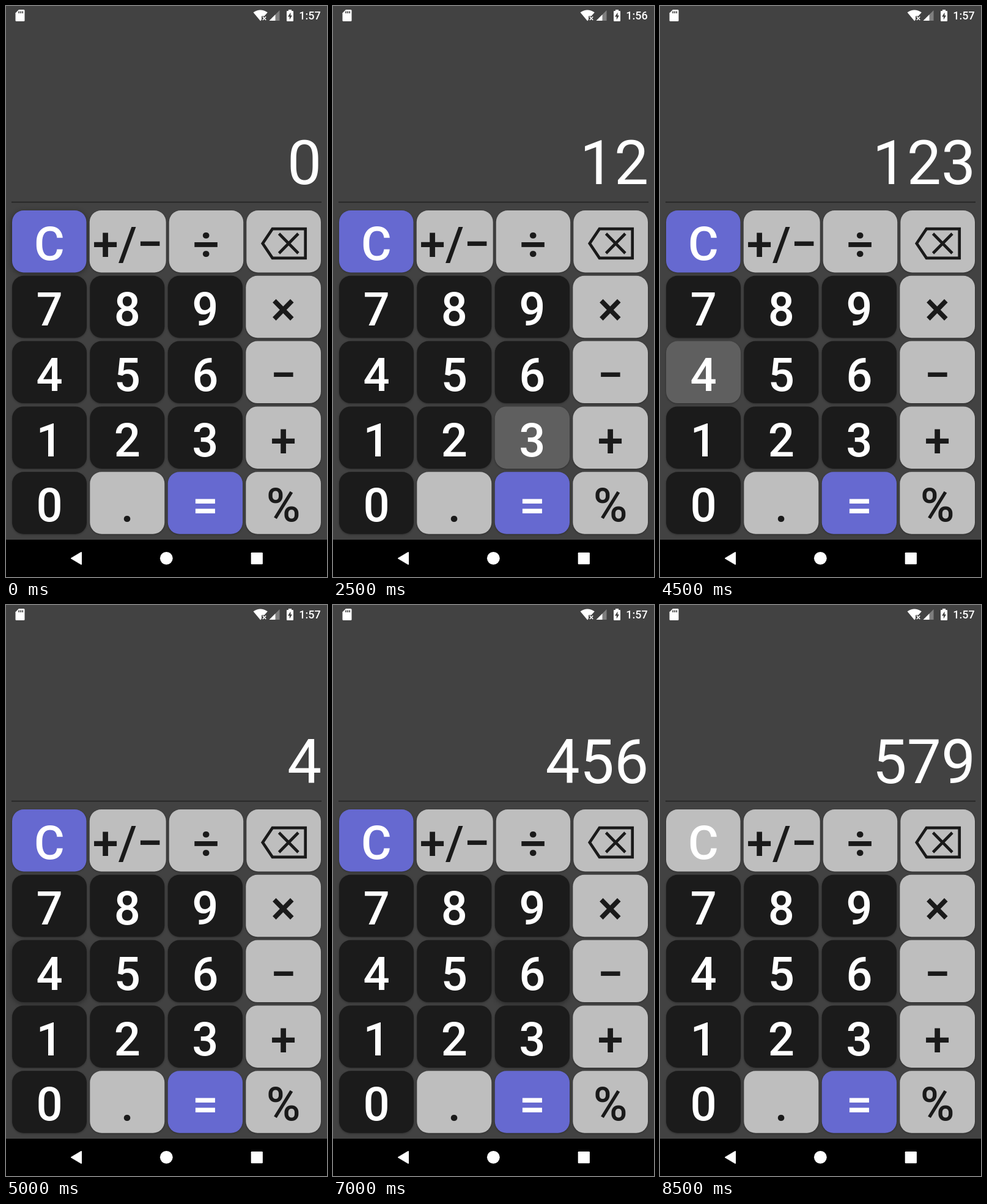
Animation of 525 by 933 pixels, one loop 9 s. Source, as an HTML page:

```html
<!DOCTYPE html>
<html lang="en">
<head>
<meta charset="utf-8">
<title>Calculator</title>
<style>
  html, body { margin: 0; width: 100%; height: 100%; overflow: hidden; background: #424242; }
  svg { display: block; width: 100%; height: 100%; font-family: Roboto, sans-serif; }
  .key text { font-size: 76px; font-weight: 500; text-anchor: middle; }
  .key rect { filter: drop-shadow(0 1.5px 1.5px rgba(0, 0, 0, .32)); }
  .key.raised rect { filter: drop-shadow(0 2.5px 4px rgba(0, 0, 0, .42)); }
</style>
</head>
<body>
<svg id="stage" viewBox="0 0 525 933">
  <rect width="525" height="933" fill="#424242"/>

  <g fill="#fff">
    <path d="M21 6H29Q30.5 6 30.5 7.5V23.5Q30.5 25 29 25H17Q15.5 25 15.5 23.5V11.5Z"/>
    <path d="M21.2 8.5V12M24.2 8.5V12M27.2 8.5V12" stroke="#424242" stroke-width="1.7"/>
    <path d="M404.5 10.5Q416 2.5 427.8 10.5L422.5 16.5H418V22.3L416.2 24.5Z"/>
    <path d="M419.8 17.5L425.2 23M425.2 17.5L419.8 23" stroke="#fff" stroke-width="1.7"/>
    <path d="M447.5 7V24H430.5Z" fill-opacity=".32"/>
    <path d="M440.5 14V24H430.5Z"/>
    <path d="M462 6H467V8H469Q470 8 470 9V24Q470 25 469 25H460Q459 25 459 24V9Q459 8 460 8H462Z"/>
    <path d="M465.5 10.5L461 17.5H463.8V22.5L468 15.5H465.5Z" fill="#424242"/>
    <text id="clock" x="514.8" y="22" font-size="18" font-weight="500" text-anchor="end"></text>
  </g>

  <text id="display" x="516.2" y="291" font-size="100" fill="#fff" text-anchor="end"></text>
  <rect x="9" y="319.7" width="507" height="1.6" fill="#222"/>
  <g id="keys"></g>

  <rect y="872" width="525" height="61" fill="#000"/>
  <g fill="#fff">
    <path d="M107 902.5L123 893V912Z" stroke="#fff" stroke-width="2" stroke-linejoin="round"/>
    <circle cx="262.3" cy="902.3" r="10.4"/>
    <rect x="400.7" y="893" width="19.2" height="19.2" rx="1.2"/>
  </g>
</svg>
<script>
const STEP = 500, STEPS = 18;
const presses = '123+456=C';
const shown = ['0', '1', '12', '123', '123', '4', '45', '456', '579'];

const rows = [['C', '+/−', '÷', 'del'], [...'789×'], [...'456−'], [...'123+'], [...'0.=%']];
const topCols = [[10, 121.5], [136.7, 125], [266.7, 121.5], [393.3, 121.7]];
const cols = [[10, 122], [137.3, 122], [264.7, 122.3], [392.3, 122.7]];
const $ = id => document.getElementById(id);

function look(label) {
  if (/[C=]/.test(label)) return { fill: '#6669d0', ink: '#fff', down: '#bebebe' };
  if (/^\d$/.test(label)) return { fill: '#1b1b1b', ink: '#fff', down: '#5f5f5f' };
  return { fill: '#bebebe', ink: '#1a1a1a', down: '#5f5f5f' };
}

function add(parent, tag, attrs) {
  const el = document.createElementNS('http://www.w3.org/2000/svg', tag);
  for (const name in attrs) el.setAttribute(name, attrs[name]);
  return parent.appendChild(el);
}

const keys = {};
rows.forEach((row, r) => row.forEach((label, c) => {
  const [x, width] = (r ? cols : topCols)[c];
  const y = 334 + r * 106.8;
  const { fill, ink, down } = look(label);
  const group = add($('keys'), 'g', { class: 'key' });
  const face = add(group, 'rect', { x, y, width, height: 101.5, rx: 19, fill });
  if (label === 'del') {
    add(group, 'path', {
      d: 'M489.7 364.2H435.8L419.8 388L435.8 411.8H489.7ZM446.5 372L478 404M478 372L446.5 404',
      fill: 'none', stroke: ink, 'stroke-width': 4.7
    });
  } else {
    add(group, 'text', { x: x + width / 2, y: y + 81.2, fill: ink }).textContent = label;
  }
  keys[label] = { group, face, fill, down };
}));

// Odd steps hold a key down; even steps release it and show its effect.
function render(step) {
  const turn = step >> 1;
  const held = step % 2 ? presses[turn] : '';
  const released = step % 2 ? '' : presses[(turn + 8) % 9];
  for (const label in keys) {
    const { group, face, fill, down } = keys[label];
    face.setAttribute('fill', label === held ? down : fill);
    group.classList.toggle('raised', label === released);
  }
  $('display').textContent = shown[turn];
  $('clock').textContent = step >= 1 && step < 6 ? '1:56' : '1:57';
}

const start = performance.now();
function tick() {
  render(Math.floor((performance.now() - start) / STEP) % STEPS);
  requestAnimationFrame(tick);
}
tick();
</script>
</body>
</html>
```
